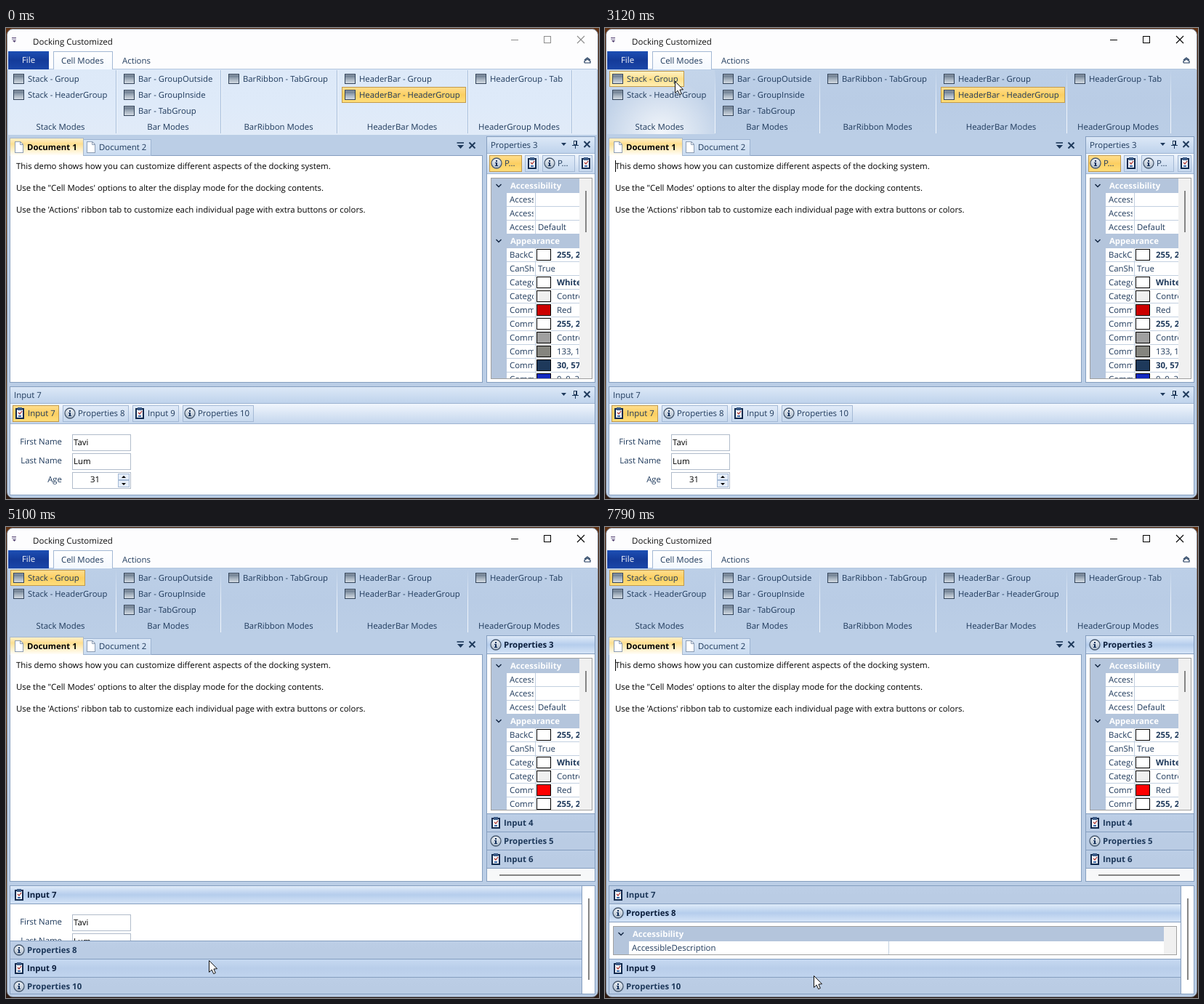
An HTML page with a canvas for the animation above (7990 ms loop, 816 by 648 pixels).

```html
<!DOCTYPE html>
<html lang="en">
<head>
<meta charset="utf-8">
<title>Docking Customized</title>
<style>
html, body { margin: 0; width: 100%; height: 100%; overflow: hidden; background: #4a2a16; }
canvas { display: block; width: 816px; height: 648px; }
</style>
</head>
<body>
<canvas id="stage" width="816" height="648"></canvas>
<script>
const c = document.getElementById('stage').getContext('2d');
const LOOP = 7990;
const NAVY = '#1e395b', LINE = '#859ebf', BACK = '#bbcee6', GUTTER = '#b4c5dc', GRID = '#c3d0e0';

// Pointer moves: start, end, number of steps, evenly spaced way points
const MOVES = [
  [330, 1100, 12, [[546, 621], [206, 189]]],
  [1170, 1520, 6, [[172, 158], [140, 135], [118, 121], [104, 110], [104, 104], [102, 99]]],
  [1720, 1860, 3, [[99, 87], [97, 78], [96, 73]]],
  [3650, 4410, 11, [[101, 84], [128, 138], [163, 206], [188, 330], [208, 460], [220, 522]]],
  [4480, 4760, 5, [[232, 545], [262, 600], [280, 627]]],
  [4960, 5240, 5, [[280, 627], [280, 612], [279, 596], [284, 585], [288, 576]]],
  [6840, 7120, 5, [[288, 585], [287, 605], [287, 618], [287, 624], [287, 627]]],
  [7650, 7790, 3, [[287, 627], [287, 622], [287, 617]]]
];

function pointerAt(t) {
  const move = MOVES.filter(m => m[0] <= t).pop();
  if (!move) return null;
  const [start, end, steps, path] = move;
  const step = Math.min(steps - 1, Math.floor((t - start) / (end - start) * (steps - 1) + 1e-6));
  const along = step / (steps - 1) * (path.length - 1);
  const i = Math.min(path.length - 2, Math.floor(along)), f = along - i;
  return [0, 1].map(n => Math.round(path[i][n] + (path[i + 1][n] - path[i][n]) * f));
}

function caretAt(t) {
  if (t < 2850) return false;
  if (t < 4960) return true;
  return [[5510, 6040], [6570, 7100], [7650, LOOP]].some(([a, b]) => t >= a && t < b);
}

function fill(x, y, w, h, color) {
  c.fillStyle = color;
  c.fillRect(x, y, w, h);
}

function box(x, y, w, h, color, border) {
  fill(x, y, w, h, color);
  c.strokeStyle = border;
  c.lineWidth = 1;
  c.strokeRect(x + .5, y + .5, w - 1, h - 1);
}

function shade(y, h, ...colors) {
  const g = c.createLinearGradient(0, y, 0, y + h);
  colors.forEach((color, i) => g.addColorStop(i / (colors.length - 1), color));
  return g;
}

function line(color, width, ...points) {
  c.beginPath();
  for (let i = 0; i < points.length; i += 2) c.lineTo(points[i], points[i + 1]);
  c.strokeStyle = color;
  c.lineWidth = width;
  c.stroke();
}

function shape(color, ...points) {
  c.beginPath();
  for (let i = 0; i < points.length; i += 2) c.lineTo(points[i], points[i + 1]);
  c.closePath();
  c.fillStyle = color;
  c.fill();
}

// y is the middle of the text line
function text(s, x, y, { color = NAVY, bold = false, align = 'left', size = 11.42 } = {}) {
  c.font = `${bold ? 'bold ' : ''}${size}px "Open Sans", "Noto Sans", sans-serif`;
  c.textAlign = align;
  c.fillStyle = color;
  c.fillText(s, x, y + 4);
}

function clipped(x, y, w, h, draw) {
  c.save();
  c.beginPath();
  c.rect(x, y, w, h);
  c.clip();
  draw();
  c.restore();
}

function infoIcon(x, y) {
  c.beginPath();
  c.arc(x, y, 7, 0, 7);
  c.fillStyle = shade(y - 7, 14, '#eef2f6', '#aebccc');
  c.fill();
  c.strokeStyle = '#46586e';
  c.lineWidth = 1.3;
  c.stroke();
  fill(x - 1, y - 4, 2, 2, '#12305c');
  fill(x - 1, y - 1, 2, 5, '#12305c');
  fill(x - 2, y - 1, 1, 1, '#12305c');
  fill(x - 2, y + 3, 4, 1, '#12305c');
}

function formIcon(x, y) {
  fill(x - 6, y - 7, 12, 15, '#10294d');
  fill(x - 4, y - 5, 8, 11, '#f2f6fb');
  fill(x - 3, y - 8, 6, 4, '#3c5b87');
  line('#b0332c', 1.2, x - 2, y - 1, x, y + 1, x + 3, y - 3);
  fill(x - 2, y + 3, 4, 2, '#3a69a8');
}

const iconFor = label => label.startsWith('Input') ? formIcon : infoIcon;

function pageIcon(x, y) {
  shape('#8c9db4', x, y, x + 8, y, x + 12, y + 4, x + 12, y + 16, x, y + 16);
  shape('#fff', x + 1, y + 1, x + 7.5, y + 1, x + 11, y + 4.5, x + 11, y + 15, x + 1, y + 15);
  line('#8c9db4', 1, x + 7.5, y, x + 7.5, y + 4.5, x + 12, y + 4.5);
}

function cross(x, y, r, color, width) {
  line(color, width, x - r, y - r, x + r, y + r);
  line(color, width, x + r, y - r, x - r, y + r);
}

function titleIcons(y) {
  shape(NAVY, 764, y - 2, 771, y - 2, 767.5, y + 2);
  box(781, y - 5, 5, 6, '#e7f0fb', NAVY);
  fill(784, y - 5, 2, 6, NAVY);
  line(NAVY, 1, 779, y + 1.5, 788, y + 1.5);
  line(NAVY, 1, 783.5, y + 1, 783.5, y + 6);
  cross(799.5, y, 4, NAVY, 2);
}

function goldButton(x, y, w, h, hot) {
  box(x, y, w, h, hot ? shade(y, h, '#fff3c8', '#ffe08a', '#fff0b8') : shade(y, h, '#ffdf91', '#fccf62', '#ffdf7c'), '#c39a49');
}

function ribbonItem(x, y, label) {
  box(x, y - 7, 15, 14, shade(y - 7, 14, '#52647a', '#9eabb9', '#dce3ea'), '#33445a');
  line('rgba(255,255,255,.35)', 1, x + 1, y - 5.5, x + 14, y - 5.5);
  text(label, x + 20, y, { size: 11.3 });
}

const GROUPS = [
  [10, 75, 151, 'Stack Modes', ['Stack - Group', 'Stack - HeaderGroup']],
  [162, 223, 295, 'Bar Modes', ['Bar - GroupOutside', 'Bar - GroupInside', 'Bar - TabGroup']],
  [306, 375, 455, 'BarRibbon Modes', ['BarRibbon - TabGroup']],
  [466, 545, 635, 'HeaderBar Modes', ['HeaderBar - Group', 'HeaderBar - HeaderGroup']],
  [646, 706, 778, 'HeaderGroup Modes', ['HeaderGroup - Tab']]
];

function drawFrame(s) {
  fill(0, 0, 816, 648, shade(0, 648, '#5e3012', '#2f1b10', '#6e4018', '#3a2113', '#704a24', '#2c1a12'));
  c.beginPath();
  c.roundRect(1.5, 1.5, 813, 645, 8);
  c.fillStyle = BACK;
  c.fill();
  c.save();
  c.clip();
  fill(0, 0, 816, 57, '#fdfdfe');
  c.restore();
  c.strokeStyle = '#7c8796';
  c.lineWidth = 1;
  c.stroke();

  line('#5b4a78', 1, 8, 13.5, 14, 13.5);
  line('#8f86a8', 1, 8, 15.5, 14, 15.5);
  shape('#5b4a78', 9, 17, 14, 17, 11.5, 20);
  text('Docking Customized', 37, 19, { color: '#111', size: 11.55 });
  const ink = s.active ? '#000' : '#8d8d8d';
  line(ink, 1, 695, 16.5, 705, 16.5);
  c.strokeRect(740.5, 11.5, 9, 9);
  cross(791, 16, 5, ink, 1.1);
}

function drawRibbon(s) {
  fill(3, 32, 56, 25, shade(32, 25, '#1d4fb4', '#143b9a', '#1b46a8'));
  text('File', 31, 44, { color: '#fff', align: 'center' });
  line('#b3c6df', 1, 59, 56.5, 813, 56.5);
  box(65, 32, 82, 26, shade(32, 26, '#fff', '#f3f8fe'), '#a3b8d4');
  text('Cell Modes', 76, 45);
  text('Actions', 160, 45);
  line(NAVY, 1.2, 796, 44, 800, 41, 804, 44);
  line(NAVY, 1.2, 796, 48, 796, 45.5, 800, 43, 804, 45.5, 804, 48, 796, 48);

  fill(3, 57, 810, 90, s.active ? shade(57, 90, '#bccfe7', '#b9cce5', '#bbcee6') : shade(57, 90, '#dde9f8', '#deeaf9', '#e1ebf8'));
  if (s.groupHot) {
    const g = c.createRadialGradient(77, 148, 4, 77, 148, 80);
    g.addColorStop(0, 'rgba(255,255,255,.8)');
    g.addColorStop(1, 'rgba(255,255,255,.12)');
    fill(3, 58, 148, 88, g);
  }
  if (s.stacked || s.buttonHot) goldButton(6, 59, 103, 22, s.buttonHot);
  if (!s.stacked) goldButton(462, 81, 171, 22);
  for (const [x, middle, edge, title, items] of GROUPS) {
    items.forEach((label, i) => ribbonItem(x, 70 + 22 * i, label));
    text(title, middle, 136, { align: 'center' });
    if (s.active) {
      fill(edge, 58, 1, 87, shade(58, 87, BACK, '#e9f0f9', '#f3f7fc'));
    } else {
      fill(edge, 58, 1, 87, '#a9bfdb');
      fill(edge + 1, 58, 1, 87, '#eff5fc');
    }
  }
}

function drawDocument(s) {
  box(5, 175, 651, 313, '#fff', LINE);
  box(106, 153, 94, 23, shade(153, 22, '#dbe7f6', '#cbdcf1'), '#9db4d2');
  box(5, 151, 102, 25, shade(151, 25, '#fff3d0', '#ffdf92', '#fff0c8', '#ffffff'), '#aab8c8');
  fill(6, 175, 100, 1, '#fff');
  pageIcon(12, 156);
  pageIcon(111, 156);
  text('Document 1', 29, 164, { color: '#000', bold: true });
  text('Document 2', 128, 164);
  line(NAVY, 1.6, 620.5, 158, 630, 158);
  shape(NAVY, 621, 161, 630, 161, 625.5, 166);
  cross(641.5, 161.5, 4, NAVY, 2);
  const copy = [
    'This demo shows how you can customize different aspects of the docking system.',
    'Use the "Cell Modes\' options to alter the display mode for the docking contents.',
    "Use the 'Actions' ribbon tab to customize each individual page with extra buttons or colors."
  ];
  copy.forEach((row, i) => text(row, 14, 190 + 30 * i, { color: '#000' }));
  if (s.caret) fill(14, 182, 1, 16, '#000');
}

function toolButton(x, y, w, label, caption, selected) {
  if (selected) goldButton(x, y, w, 23);
  else box(x, y, w, 23, shade(y, 23, '#e2ecf9', '#c6d8ee'), '#a4b9d5');
  iconFor(label)(x + 10, y + 11);
  if (caption) text(caption, x + 21, y + 11);
}

function drawCategory(x, y, w, label) {
  fill(x, y - 10, w, 20, GUTTER);
  line('#10233f', 1.4, x + 6.5, y - 2, x + 10, y + 1.5, x + 13.5, y - 2);
  text(label, x + 26, y, { color: '#fff', bold: true });
}

// name, value, swatch colour, bold value
const PROPS = [
  ['AccessibleDescription', ''], ['AccessibleName', ''], ['AccessibleRole', 'Default'], null,
  ['BackColor', '255, 255, 255', '#fff', true], ['CanShowCommands', 'True'],
  ['CategoryForeColor', 'White', '#fff', true], ['CategorySplitter', 'Control', '#f0f0f0'],
  ['CommandsActive', 'Red', 'red'], ['CommandsBack', '255, 255, 255', '#fff', true],
  ['CommandsBorder', 'ControlDark', '#a0a0a0'], ['CommandsDisabled', '133, 133, 133', '#85857f'],
  ['CommandsFore', '30, 57, 91', '#1e395b', true], ['CommandsLink', '0, 0, 255', '#1228c0']
];

function drawSideGrid(y, h, red, thumbEnd) {
  box(667, y - 1, 140, h + 2, '#fff', '#a0a0a0');
  clipped(668, y, 138, h, () => {
    fill(668, y, 21, h, GUTTER);
    drawCategory(668, y + 10, 121, 'Accessibility');
    PROPS.forEach((prop, i) => {
      const mid = y + 29 + 19 * i;
      if (!prop) return drawCategory(668, mid, 121, 'Appearance');
      const [name, value, swatch, bold] = prop;
      line(GRID, 1, 689, mid + 9.5, 789, mid + 9.5);
      line(GRID, 1, 728.5, mid - 9, 728.5, mid + 10);
      clipped(689, mid - 9, 37, 19, () => text(name, 693, mid));
      clipped(729, mid - 9, 60, 19, () => text(value, swatch ? 758 : 732, mid, { bold }));
      if (swatch) box(730, mid - 8, 20, 16, swatch === 'red' ? red : swatch, '#000');
    });
    fill(789, y, 17, h, '#f0f0f0');
    line('#858585', 2, 798, y + 17, 798, thumbEnd);
  });
}

function panelTitle(x, y, w, label) {
  fill(x, y, w, 22, shade(y, 22, '#dce8f7', '#bfd3ec'));
  text(label, x + 5, y + 11);
  titleIcons(y + 10);
  line('#9fb5d2', 1, x, y + 22.5, x + w, y + 22.5);
}

const ROW_FILLS = {
  open: ['#dfebf9', '#b5cdec', '#d5e4f7'],
  hot: ['#c6d9f1', '#b9ceea', '#c0d4ee'],
  down: ['#a9c0df', '#a2bbdc', '#b0c6e2'],
  idle: ['#bccee6', '#bacce4', '#bacce4']
};

function stackRow(x, y, w, label, state = 'idle') {
  fill(x, y, w, 24, shade(y, 24, ...ROW_FILLS[state]));
  line(LINE, 1, x, y + 24.5, x + w, y + 24.5);
  iconFor(label)(x + 12, y + 12);
  text(label, x + 23, y + 12, { bold: true, color: state === 'idle' ? NAVY : '#0c1f3d' });
}

function drawSide(s) {
  box(661, 149, 150, 339, '#fff', LINE);
  if (!s.stacked) {
    panelTitle(662, 150, 148, 'Properties 3');
    fill(662, 173, 148, 28, shade(173, 28, '#f1f6fd', '#c4d6ed'));
    line('#9fb5d2', 1, 662, 200.5, 810, 200.5);
    toolButton(665, 175, 45, 'Properties', 'P...', true);
    toolButton(714, 175, 19, 'Input');
    toolButton(738, 175, 45, 'Properties', 'P...');
    toolButton(788, 175, 19, 'Input');
    drawSideGrid(207, 275, '#cc0000', 281);
    return;
  }
  stackRow(662, 150, 148, 'Properties 3', 'open');
  drawSideGrid(181, 208, '#ff0000', 227);
  line(LINE, 1, 662, 394.5, 810, 394.5);
  ['Input 4', 'Properties 5', 'Input 6'].forEach((label, i) => stackRow(662, 395 + 25 * i, 148, label));
  fill(662, 470, 148, 17, '#f7f8f9');
  line('#858585', 2, 679, 479, 791, 479);
}

function drawForm(y) {
  const fields = [['First Name', 'Tavi'], ['Last Name', 'Lum'], ['Age', '31']];
  fields.forEach(([label, value], i) => {
    const mid = y + 26 * i;
    text(label, 77, mid, { align: 'right' });
    box(91, mid - 10, 81, 23, '#fff', '#b1bccb');
    text(value, i === 2 ? 129 : 93, mid + (i < 2 ? 1 : 0), { color: '#000', align: i === 2 ? 'right' : 'left' });
  });
  const mid = y + 52;
  box(154, mid - 8, 16, 9, '#e6eef9', '#a4b9d5');
  box(154, mid + 1, 16, 10, '#e6eef9', '#a4b9d5');
  shape('#000', 159, mid - 2, 165, mid - 2, 162, mid - 5);
  shape('#000', 159, mid + 5, 165, mid + 5, 162, mid + 8);
}

function drawBottom(s) {
  box(5, 493, 806, 150, '#fff', LINE);
  if (!s.stacked) {
    panelTitle(6, 494, 804, 'Input 7');
    fill(6, 517, 804, 27, shade(517, 27, '#f1f6fd', '#c4d6ed'));
    line('#9fb5d2', 1, 6, 544.5, 810, 544.5);
    const tabs = [[9, 64, 'Input 7'], [78, 91, 'Properties 8'], [174, 64, 'Input 9'], [243, 98, 'Properties 10']];
    tabs.forEach(([x, w, label], i) => toolButton(x, 519, w, label, label, i === 0));
    drawForm(569);
    return;
  }
  if (s.second) {
    box(11, 549, 776, 40, '#fff', '#a0a0a0');
    drawCategory(12, 560, 757, 'Accessibility');
    fill(12, 570, 21, 18, GUTTER);
    line(GRID, 1, 390.5, 570, 390.5, 588);
    text('AccessibleDescription', 37, 579);
    fill(769, 550, 17, 38, '#f0f0f0');
  } else {
    clipped(6, 519, 786, 51, () => drawForm(543));
  }
  const foot = s.second ? 594.5 : 569.5;
  line(LINE, 1, 6, foot, 792, foot);
  const rows = [['Input 7', 494], ['Properties 8', s.second ? 519 : 570], ['Input 9', 595], ['Properties 10', 620]];
  rows.forEach(([label, y], i) => {
    const hot = s.settled && s.pointer[1] >= y && s.pointer[1] < y + 25;
    const state = i === +s.second ? 'open' : hot ? (s.pressed ? 'down' : 'hot') : 'idle';
    clipped(6, y, 786, Math.min(25, 642 - y), () => stackRow(6, y, 786, label, state));
  });
  line(LINE, 1, 792.5, 494, 792.5, 642);
  line('#858585', 2, 802, 511, 802, 623);
}

function drawPointer([x, y]) {
  if (x > 5 && x < 656 && y > 175 && y < 488) {
    line('#222', 1, x - 3, y - 7.5, x - .5, y - 7.5, x + .5, y - 6.5, x + .5, y + 6.5, x - .5, y + 7.5, x - 3, y + 7.5);
    line('#222', 1, x + 4, y - 7.5, x + 1.5, y - 7.5, x + .5, y - 6.5);
    line('#222', 1, x + 4, y + 7.5, x + 1.5, y + 7.5, x + .5, y + 6.5);
    return;
  }
  c.beginPath();
  c.moveTo(x + .5, y + .5);
  [[0, 16], [3.7, 12.6], [6.2, 18.2], [8.8, 17], [6.4, 11.6], [11, 11.2]].forEach(([dx, dy]) => c.lineTo(x + .5 + dx, y + .5 + dy));
  c.closePath();
  c.fillStyle = '#fff';
  c.fill();
  c.strokeStyle = '#111';
  c.lineWidth = 1;
  c.stroke();
}

function draw(t) {
  const pointer = pointerAt(t);
  const s = {
    pointer,
    active: t >= 2850,
    caret: caretAt(t),
    groupHot: t >= 2920 && pointer[1] < 146,
    buttonHot: t >= 2920 && pointer[1] < 81,
    stacked: t >= 3260,
    settled: t >= 4480,
    pressed: t >= 6170 && t < 6440,
    second: t >= 6440
  };
  drawFrame(s);
  drawRibbon(s);
  drawDocument(s);
  drawSide(s);
  drawBottom(s);
  if (pointer) drawPointer(pointer);
}

c.textRendering = 'geometricPrecision';
const begin = performance.now();
function tick() {
  draw((performance.now() - begin) % LOOP);
  requestAnimationFrame(tick);
}
tick();
</script>
</body>
</html>
```
